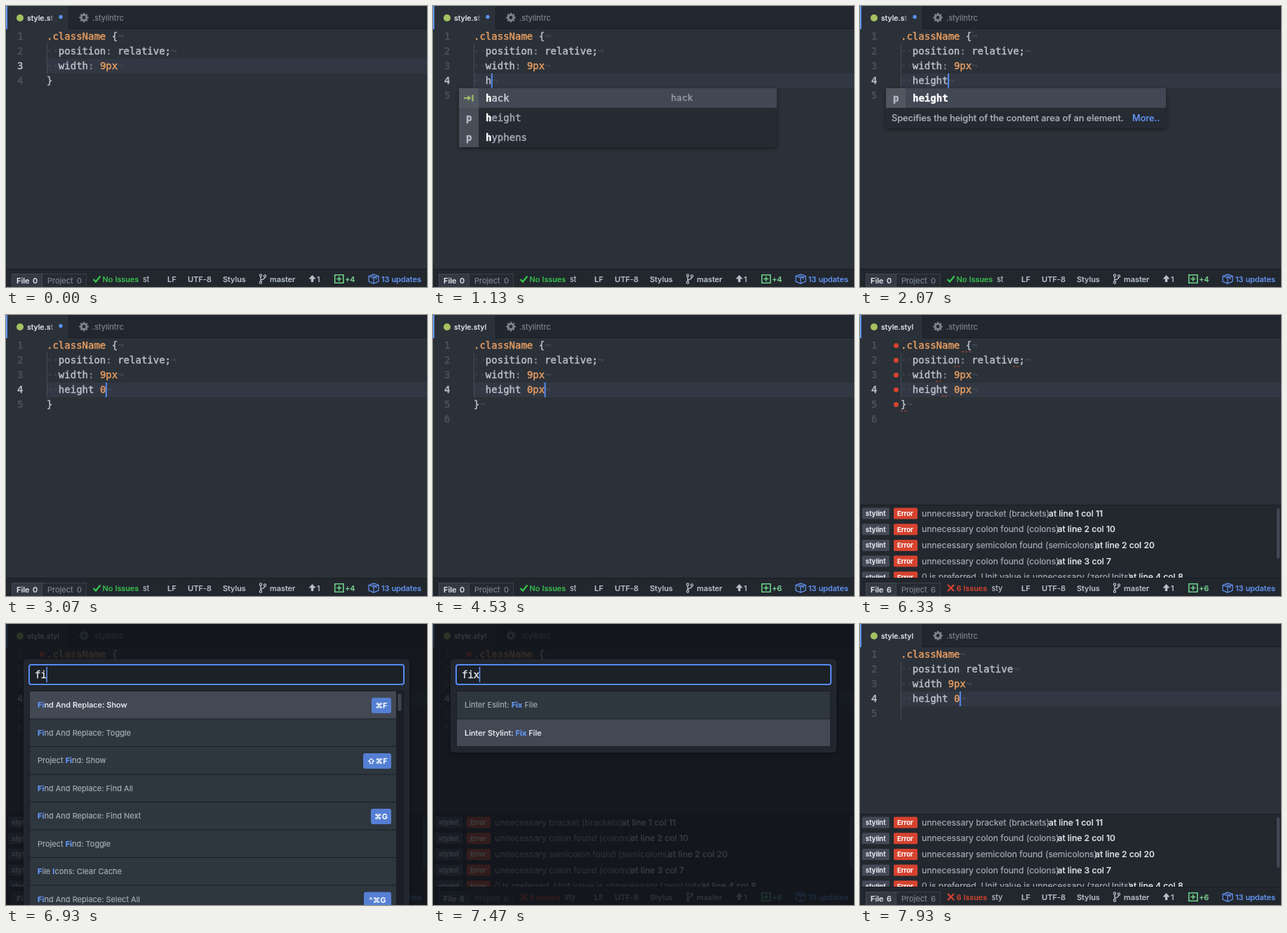
An HTML page that plays this animation: 600 px wide and 400 px high, repeating every 8000 ms.

```html
<!DOCTYPE html>
<html lang="en">
<head>
<meta charset="utf-8">
<title>Editor linting demo</title>
<style>
  html, body { margin: 0; width: 100%; height: 100%; overflow: hidden; background: #2b3138; }
  svg { display: block; width: 600px; height: 400px; }
  text { font: 11px Inter, sans-serif; white-space: pre; stroke-width: .2px; }
  .mono { font: 14px "DejaVu Sans Mono", monospace; stroke-width: .45px; }
  .medium { font-weight: 500; }
  .bold { font-weight: 700; }
  .title { font-size: 10.6px; font-weight: 500; }
  .lint { font-size: 12.15px; }
  .help { font-size: 12.75px; font-weight: 500; }
  .badge { font-size: 9.5px; font-weight: 600; }
  .key { font: bold 11px Inter, "DejaVu Sans", sans-serif; }
</style>
</head>
<body>
<svg id="stage" viewBox="0 0 600 400"></svg>
<script>
const LOOP = 8000, CHAR = 8.43, LEFT = 58, TOP = 33, LINE = 21;
const INK = '#b9c0cb', DIM = '#7c8390', FAINT = '#404752', ORANGE = '#e59c62',
      BLUE = '#6495f5', RED = '#d6432f', GREEN = '#38c24e', LIGHT = '#e2e6ec';

// Step tables: [start in ms, value]
const typed = [[0, null], [730, ''], [1000, 'h'], [1530, 'he'], [1670, 'hei'], [1800, 'heig'],
  [1930, 'heigh'], [2030, 'height'], [2530, 'height '], [2800, 'height 0'],
  [3330, 'height 0p'], [3530, 'height 0px']];
const caret = [[0, 0], [130, 1], [530, 0], [730, 1], [2330, 0], [2530, 1], [4000, 0],
  [4530, 1], [4930, 0], [5330, 1], [5730, 0], [7800, 1]];
const popup = [[0, ''], [1070, 'list'], [1600, 'help'], [2560, '']];
const query = [[0, null], [6530, ''], [6730, 'f'], [6870, 'fi'], [7200, 'fix'], [7730, null]];
const SAVED = 4070, COUNTED = 4530, LINTED = 4900, MOVED = 7470, FIXED = 7800;

const issues = [
  ['unnecessary bracket (brackets)', 269, '1 col 11'],
  ['unnecessary colon found (colons)', 281.5, '2 col 10'],
  ['unnecessary semicolon found (semicolons)', 335, '2 col 20'],
  ['unnecessary colon found (colons)', 281.5, '3 col 7'],
  ['0 is preferred. Unit value is unnecessary (zeroUnits)', 383, '4 col 8']
];
const squiggles = [[1, 145, 158], [2, 134, 143], [2, 218, 226], [3, 108, 118], [4, 116, 126], [5, 58, 66]];
// Brackets mark the matched letters
const commands = [
  ['[Fi]nd And Replace: Show', '⌘F', 28], ['[Fi]nd And Replace: Toggle'],
  ['Project [Fi]nd: Show', '⇧⌘F', 40], ['[Fi]nd And Replace: Find All'],
  ['[Fi]nd And Replace: Find Next', '⌘G', 29], ['Project [Fi]nd: Toggle'],
  ['[F]ile [I]cons: Clear Cache'], ['[Fi]nd And Replace: Select All', '^⌘G', 39]
];
const fixes = [['Linter Eslint: [Fix] File'], ['Linter Stylint: [Fix] File']];

const at = (steps, t) => steps.filter(s => s[0] <= t).pop()[1];
const ink = (fill, cls) => `fill="${fill}" stroke="${fill}" class="${cls}"`;
const text = (x, y, s, fill, cls = '') => `<text x="${x}" y="${y}" ${ink(fill, cls)}>${s}</text>`;
const span = (s, fill, cls = '') => `<tspan ${ink(fill, cls)}>${s}</tspan>`;
const box = (x, y, w, h, fill, more = '') =>
  `<rect x="${x}" y="${y}" width="${w}" height="${h}" fill="${fill}" ${more}/>`;
const path = (d, stroke, w = 1, more = '') =>
  `<path d="${d}" fill="none" stroke="${stroke}" stroke-width="${w}" ${more}/>`;
const dot = (x, y, r, fill) => `<circle cx="${x}" cy="${y}" r="${r}" fill="${fill}"/>`;

function documentLines(t) {
  if (t >= FIXED) return ['.className', '  position relative', '  width 9px', '  height 0', ''];
  const lines = ['.className {', '  position: relative;', '  width: 9px'];
  const fourth = at(typed, t);
  if (fourth !== null) lines.push('  ' + fourth);
  lines.push('}');
  if (t >= SAVED) lines.push('');
  return lines;
}

const colour = line => line.replace(/^ +|\.className|\d\w*|:/g, m =>
  m[0] === ' ' ? span('·'.repeat(m.length), FAINT) : span(m, m === ':' ? DIM : ORANGE));

function editor(t) {
  const lines = documentLines(t), active = t < 730 ? 2 : 3;
  let out = box(58, TOP + active * LINE, 542, LINE, '#323843');
  lines.forEach((line, i) => {
    const top = TOP + i * LINE, base = top + 15, last = i === lines.length - 1;
    out += text(16, base, i + 1, i === active ? '#b9c0cb' : '#4b5260', 'mono');
    out += text(LEFT, base, colour(line) + (last ? '' : span('¬', FAINT)), INK, 'mono');
    if (line.startsWith('  ') || (t >= FIXED && last)) out += box(58, top, 1, LINE, '#464d58');
  });
  if (t >= LINTED && t < FIXED) {
    for (let i = 0; i < 5; i++) out += dot(51.5, TOP + i * LINE + 10.5, 3.5, RED);
    for (const [row, a, b] of squiggles)
      out += path(`M${a} ${TOP + row * LINE - 1.5}H${b}`, '#c2432f', 1, 'stroke-dasharray="3 2"');
  }
  if (at(caret, t)) {
    const x = LEFT + lines[active].length * CHAR;
    out += box(x - .5, TOP + active * LINE, 2, LINE, '#568af2');
  }
  return out;
}

function tabs(t) {
  let out = box(0, 0, 600, 33, '#22272f') + box(0, 32, 600, 1, '#1a1e24') +
    box(0, 0, 89, 33, '#2b3138') + box(0, 0, 2, 33, '#6094f8') + box(89, 0, 1, 33, '#1a1e24') +
    dot(20, 17, 5, '#a5c261');
  const title = t < SAVED ? 'style.s' + span('t', '#777d88') : 'style.styl';
  out += text(30, 20.5, title, LIGHT, 'title');
  if (t < SAVED) out += dot(78, 15.5, 2.7, '#5a92f5');
  out += `<circle cx="111" cy="16.5" r="3.8" fill="none" stroke="#7d838e" stroke-width="2.8"/>`;
  for (let i = 0; i < 8; i++)
    out += path('M111 9.8V12', '#7d838e', 2.4, `transform="rotate(${i * 45} 111 16.5)"`);
  return out + text(123, 20.5, '.stylintrc', '#7d838e');
}

function completions(t) {
  const kind = at(popup, t), word = at(typed, t);
  if (!kind) return '';
  const list = kind === 'list', names = list ? ['hack', 'height', 'hyphens'] : ['height'];
  const w = list ? 453 : 399, h = list ? 84 : 57;
  let out = box(37, 117, w, h, '#252a31', 'rx="2" filter="url(#shadow)"') + box(37, 117, w, 28, '#414753', 'rx="2"');
  names.forEach((name, i) => {
    const y = 117 + i * 28;
    out += box(37, y, 28, 28, i ? '#484e57' : '#515761');
    out += list && !i
      ? path('M44 131H51M56.5 126.5V136', '#9fbc68', 2.2) + '<path d="M49.5 127l5 4-5 4z" fill="#9fbc68"/>'
      : text(47, y + 18.5, 'p', '#b3b9c4', 'mono bold');
    out += text(75, y + 19, span(name.slice(0, word.length), '#fff', 'bold') + name.slice(word.length),
      i ? '#a5acb8' : '#cbd0d9', 'mono');
  });
  return out + (list
    ? `<text x="339" y="135" ${ink('#9299a5', 'mono')} style="font-size:13px">hack</text>`
    : text(45, 164, 'Specifies the height of the content area of an element.', '#a9b0bb', 'help') +
      text(388, 164, 'More..', BLUE, 'help'));
}

function lintPanel() {
  let out = box(0, 270, 600, 105, '#23282f') + box(0, 270, 600, 1, '#191d22');
  issues.forEach(([message, x, place], i) => {
    const y = 282.5 + i * 22.7;
    out += box(3, y - 8, 39, 16, '#434a57', 'rx="2"') + box(48, y - 8, 34, 16, RED, 'rx="2"') +
      text(8, y + 3.5, 'stylint', '#e4e7ec', 'badge') + text(53, y + 3.5, 'Error', '#fff', 'badge') +
      text(88, y + 4, message, '#a4abb7', 'lint') + text(x, y + 4, 'at line ' + place, LIGHT, 'lint medium');
  });
  return out + box(594, 275, 4, 72, '#434954', 'rx="2"');
}

function statusBar(t) {
  const bad = t >= LINTED, n = bad ? 6 : 0, sign = bad ? RED : GREEN;
  let out = box(0, 374, 600, 26, '#22272e') + box(0, 374, 600, 1, '#191d22') +
    box(8.5, 381.5, 106, 22, '#262b33', 'stroke="#3a404a"') + box(8.5, 381.5, 43, 22, '#343a44', 'stroke="#414853"') +
    text(15, 395, 'File', LIGHT, 'medium') + text(38, 395, n, LIGHT, 'medium') +
    text(59, 395, 'Project', DIM) + text(101, 395, n, DIM);
  out += path(bad ? 'M125 384L134 393M134 384L125 393' : 'M124.5 389L128 392.5L134.5 384.5', sign, 2.3);
  out += text(137.5, 393, bad ? '6 Issues' : 'No Issues', sign, 'medium');
  out += `<g clip-path="url(#crop)">${text(bad ? 187.5 : 195, 393, 'style.styl', INK)}</g>`;
  [[230, 'LF'], [259, 'UTF-8'], [309, 'Stylus'], [376, 'master'], [443, '1']]
    .forEach(([x, s]) => out += text(x, 393, s, INK, 'medium'));
  out += path('M363 385V392M369 385.5Q369 389 363 390', INK, 1.4);
  for (const [x, y] of [[363, 383.5], [369, 384.5], [363, 393.5]])
    out += `<circle cx="${x}" cy="${y}" r="1.6" fill="#22272e" stroke="${INK}" stroke-width="1.2"/>`;
  out += `<path d="M436.5 383l5 5.5h-3.3v4.5h-3.4v-4.5h-3.3z" fill="${INK}"/>`;
  out += path('M468.7 382.7H480.8V394.3H468.7ZM474.7 385V392M471.2 388.5H478.2', '#6ed287', 1.6);
  out += text(483, 393, t < COUNTED ? '+4' : '+6', '#7bd692', 'medium');
  out += path('M517 384.5L524 382L531 384.5V392L524 395L517 392ZM517 384.5L524 387L531 384.5M524 387V395M520 383.3L527.5 386V389', BLUE, 1.2);
  return out + text(535, 393, '13 updates', BLUE, 'medium');
}

function palette(t) {
  const q = at(query, t);
  if (q === null) return '';
  const narrow = q === 'fix', rows = narrow ? fixes : commands, chosen = narrow && t >= MOVED ? 1 : 0;
  const match = q ? s => span(s, BLUE, 'bold') : s => s;
  let out = box(0, 0, 600, 400, '#11141a', 'opacity=".82"') +
    box(25, 50, 550, narrow ? 133 : 360, '#23282f', 'rx="5" filter="url(#shadow)"') +
    box(33, 58, 534, 28, '#1c2027', 'rx="3" stroke="#568af2" stroke-width="2"') +
    text(41, 77, q, LIGHT, 'mono') + box(40.5 + q.length * CHAR, 61, 1.5, 22, BLUE) +
    box(33, 95, 534, narrow ? 80 : 310, '#1b1f25');
  rows.forEach(([label, keys, w], i) => {
    const y = 96 + i * 39.5, on = i === chosen;
    out += box(34, y, narrow ? 532 : 522, 38.5, on ? '#424854' : '#2e363e');
    out += text(45, y + 23, label.replace(/\[(\w+)\]/g, (_, s) => match(s)), on ? '#e0e4ea' : '#a3abb6', on ? 'medium' : '');
    if (keys) out += box(549 - w, y + 9, w, 22, '#557fd3', 'rx="3"') +
      `<text x="${549 - w / 2}" y="${y + 24}" fill="#fff" class="key" text-anchor="middle">${keys}</text>`;
  });
  return out + (narrow ? '' : box(558.5, 99, 5, 25, '#3f4550', 'rx="2.5"'));
}

const defs = `<defs><clipPath id="crop"><rect x="180" y="380" width="24" height="20"/></clipPath>
  <filter id="shadow" x="-5%" y="-20%" width="110%" height="150%">
    <feDropShadow dx="0" dy="2" stdDeviation="3" flood-color="#000" flood-opacity=".45"/></filter></defs>`;

const scene = t => defs + box(0, 0, 600, 400, '#2b3138') + editor(t) + tabs(t) + completions(t) +
  (t >= LINTED ? lintPanel() : '') + statusBar(t) + palette(t);

const stage = document.getElementById('stage');
let shown = '';
function frame() {
  const next = scene(performance.now() % LOOP);
  if (next !== shown) stage.innerHTML = shown = next;
  requestAnimationFrame(frame);
}
frame();
</script>
</body>
</html>
```
